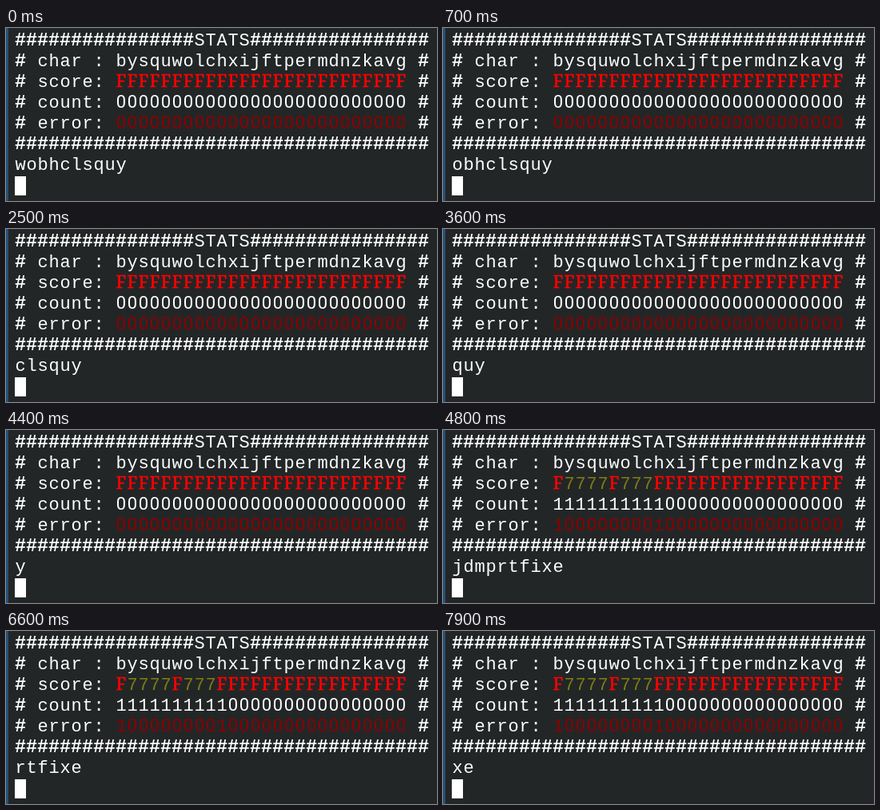
Animation of 539x217 px, one loop 8 s. Source, as an HTML page:

```html
<!DOCTYPE html>
<html lang="en">
<head>
<meta charset="utf-8">
<title>Typing trainer</title>
<style>
  html, body { margin: 0; width: 100%; height: 100%; overflow: hidden; background: #232627; }
  svg { display: block; width: 539px; height: 217px; }
  text {
    font: 22px "Liberation Mono", monospace;
    text-anchor: middle;
    fill: #fff;
  }
  .zero { font-family: Roboto, sans-serif; }
  .hash { font-size: 23.333px; font-weight: bold; }
  .fail { font: 21px "Noto Serif", serif; fill: #f00; stroke: #f00; stroke-width: 0.6px; }
  .fair { fill: #7c7c14; }
  .error { fill: #8b0000; }
</style>
</head>
<body>
<svg id="stage" viewBox="0 0 539 217">
  <rect width="539" height="217" fill="#232627"/>
  <rect width="3" height="217" fill="#24527a"/>
  <rect x="11" y="186" width="14" height="24" fill="#fff"/>
</svg>
<script>
const LOOP = 8000, LEFT = 11, CELL = 14, FIRST_LINE = 22, LINE = 26;
const KEYS = "bysquwolchxijftpermdnzkavg";
const svg = document.getElementById("stage");
const glyphClass = { 0: "zero", F: "fail", 7: "fair", "#": "hash" };

function element(name, parent, className = "") {
  const node = document.createElementNS("http://www.w3.org/2000/svg", name);
  node.setAttribute("class", className);
  return parent.appendChild(node);
}

// Each character is centred in its own terminal cell.
function write(line, column, string, className) {
  const text = element("text", svg, className);
  for (const run of string.match(/0+|F+|7+|#+|[^0F7#]+/g)) {
    const span = element("tspan", text, glyphClass[run[0]]);
    const xs = [...run].map((_, i) => LEFT + (column + i + 0.5) * CELL);
    span.setAttribute("x", xs.join(" "));
    span.setAttribute("y", FIRST_LINE + line * LINE);
    span.textContent = run;
    column += run.length;
  }
  return text;
}

const border = "#".repeat(16);
write(0, 0, border + "STATS" + border);
["char ", "score", "count", "error"].forEach((label, i) => {
  write(i + 1, 0, "#");
  write(i + 1, 2, label + ":");
  write(i + 1, 36, "#");
});
write(1, 9, KEYS);
write(5, 0, "#".repeat(37));

const rounds = [
  { start: 0, word: "wobhclsquy", score: "", count: "", error: "",
    hits: [700, 800, 1200, 2500, 3000, 3200, 3600, 4200, 4400] },
  { start: 4800, word: "jdmprtfixe", score: "F7777F777", count: "1".repeat(10), error: "1000000001",
    hits: [5500, 6000, 6300, 6600, 6900, 7200, 7700, 7900] }
];

let shown = [], current = "";

function render(now) {
  const time = now % LOOP;
  const round = time < rounds[1].start ? rounds[0] : rounds[1];
  const word = round.word.slice(round.hits.filter(hit => hit <= time).length);
  if (word === current) return;
  current = word;
  shown.forEach(node => node.remove());
  shown = [
    write(2, 9, round.score.padEnd(KEYS.length, "F")),
    write(3, 9, round.count.padEnd(KEYS.length, "0")),
    write(4, 9, round.error.padEnd(KEYS.length, "0"), "error"),
    write(6, 0, word)
  ];
}

function tick() {
  render(performance.now());
  requestAnimationFrame(tick);
}
tick();
</script>
</body>
</html>
```
